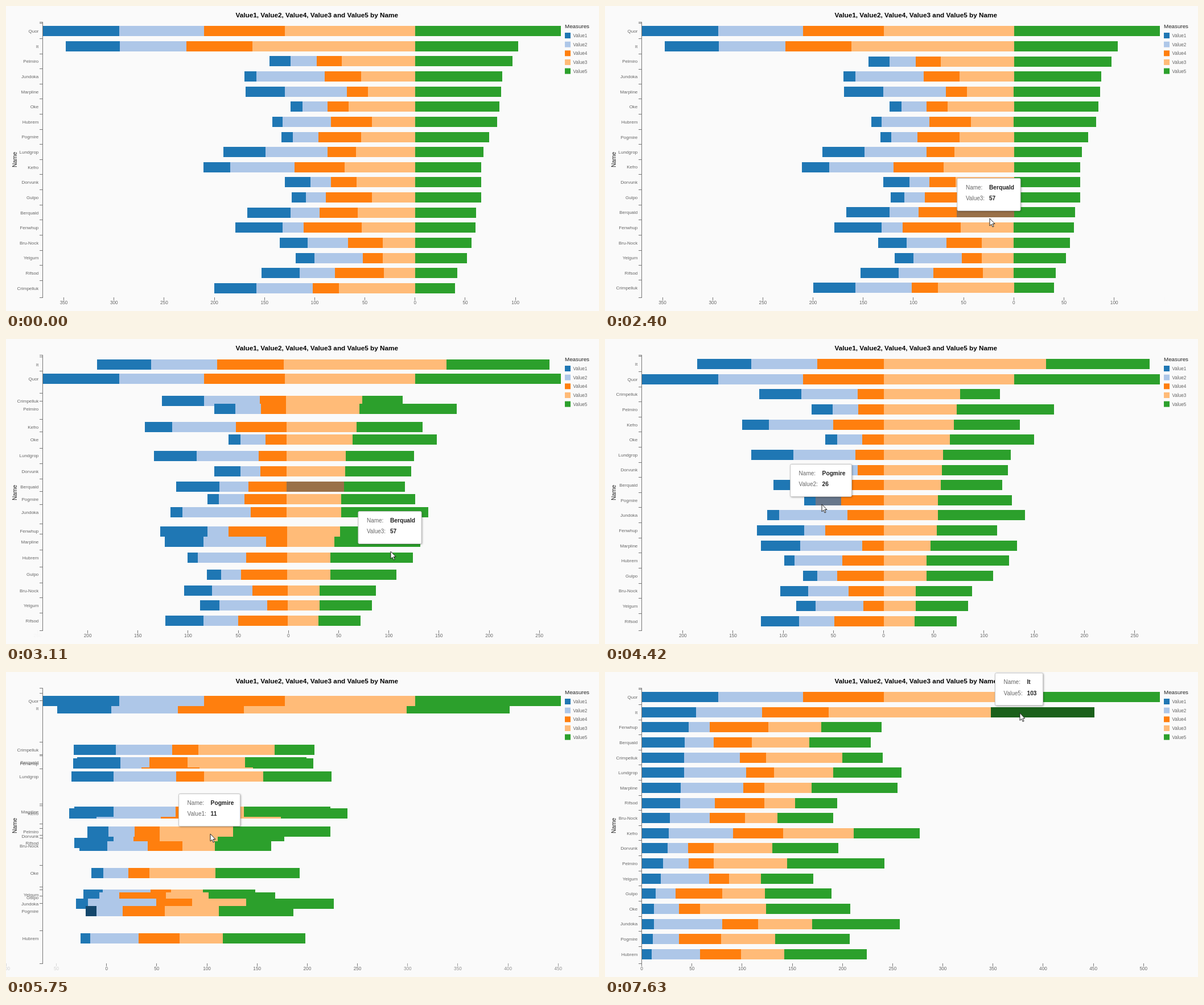
These frames come from a looping animation (1042 by 537 pixels, 8 s). An HTML page:

```html
<!DOCTYPE html>
<html lang="en">
<head>
<meta charset="utf-8">
<title>Stacked bars</title>
<style>
html, body { margin: 0; width: 100%; height: 100%; overflow: hidden; background: #fafafa; }
svg { display: block; width: 1042px; height: 537px; font-family: "Liberation Sans", Arial, sans-serif; }
.crisp { shape-rendering: crispEdges; }
</style>
</head>
<body>
<svg id="stage" viewBox="0 0 1042 537"></svg>
<script>
const LOOP = 8000, LEFT = 64.5, UNIT = 910 / 516, ROW = 26.62, TOP = 44.2, BAR = 18;
const SERIES = ['Value1', 'Value2', 'Value4', 'Value3', 'Value5'];
const COLORS = ['#1f77b4', '#aec7e8', '#ff7f0e', '#ffbb78', '#2ca02c'];
const DARK = ['#13476c', '#68778b', '#994c08', '#997048', '#1a601a'];
const rows = [
  ['Quor', 76, 85, 80, 130, 145], ['It', 54, 66, 66, 162, 103],
  ['Pelmiro', 21, 26, 25, 73, 97], ['Marpline', 39, 62, 21, 47, 86],
  ['Oke', 12, 25, 21, 66, 84], ['Hubrem', 10, 48, 41, 43, 82],
  ['Pogmire', 11, 26, 42, 54, 74], ['Jundoka', 12, 68, 36, 54, 87],
  ['Crimpelluk', 42, 56, 26, 76, 40], ['Lundgrop', 42, 62, 28, 59, 68],
  ['Kefro', 27, 64, 50, 70, 66], ['Dorvunk', 26, 20, 26, 58, 66],
  ['Gulpo', 14, 20, 46, 43, 66], ['Berquald', 43, 29, 38, 57, 61],
  ['Fenwhup', 47, 21, 58, 53, 60], ['Bru-Nock', 28, 40, 35, 32, 56],
  ['Yelgum', 19, 48, 20, 32, 52], ['Rifsod', 38, 35, 49, 31, 42]
].map(([name, ...vals]) => ({ name, vals }));

const sum = list => list.reduce((a, b) => a + b, 0);
const lerp = (a, b, p) => a + (b - a) * p;
const clamp = v => Math.max(0, Math.min(1, v));
const cubic = t => t < .5 ? 4 * t ** 3 : 1 - 4 * (1 - t) ** 3;
const smooth = t => t * t * (3 - 2 * t);

// Each mode aligns the bars on one series and sorts by it.
const modes = [4, 3, 0].map(base => {
  const order = [...rows].sort((a, b) => b.vals[base] - a.vals[base]);
  const offset = sum(rows[0].vals.slice(0, base));
  const zero = LEFT + UNIT * offset;
  return {
    zero,
    shows: v => v >= -offset && v <= 516 - offset ? 1 : 0,
    y: rows.map(r => TOP + ROW * order.indexOf(r)),
    x: rows.map(r => zero - UNIT * sum(r.vals.slice(0, base)))
  };
});

const stage = document.getElementById('stage');
function set(node, attrs) {
  for (const k in attrs) node.setAttribute(k, attrs[k]);
  return node;
}
function add(parent, tag, attrs) {
  const node = document.createElementNS('http://www.w3.org/2000/svg', tag);
  return parent.appendChild(set(node, attrs));
}
function label(parent, str, x, y, size, attrs) {
  const node = add(parent, 'text', { x, y: y + size * .36, 'font-size': size, fill: '#666', ...attrs });
  node.textContent = str;
  return node;
}
const place = (node, x, y) => set(node, { transform: `translate(${x.toFixed(2)} ${y.toFixed(2)})` });

add(stage, 'rect', { width: 1042, height: 537, fill: '#fafafa' });
const axisLine = { stroke: '#777', fill: 'none', 'stroke-width': 1, class: 'crisp' };

// Axes
add(stage, 'path', { d: 'M59 28.5H64.5V513.5H59', ...axisLine });
const rowLabels = rows.map(r => {
  const g = add(stage, 'g', {});
  add(g, 'path', { d: 'M59 -13.4H64.5', ...axisLine });
  label(g, r.name, 57.3, 0, 8, { 'text-anchor': 'end' });
  return g;
});
const ticks = [];
for (let v = -350; v <= 500; v += 50) {
  const g = add(stage, 'g', {});
  add(g, 'path', { d: 'M0 513V518', ...axisLine });
  label(g, Math.abs(v), 0, 522.5, 8.2, { 'text-anchor': 'middle' });
  ticks.push({ v, g });
}

// Bars: earlier rows lie on top.
const bars = [];
for (let i = rows.length - 1; i >= 0; i--) {
  const g = add(stage, 'g', { class: 'crisp' });
  let x = 0;
  const parts = rows[i].vals.map((v, k) => {
    const rect = add(g, 'rect', { x, y: -BAR / 2, width: v * UNIT, height: BAR, fill: COLORS[k] });
    x += v * UNIT;
    return rect;
  });
  bars[i] = { g, parts };
}

// Titles and legend
label(stage, 'Value1, Value2, Value4, Value3 and Value5 by Name', 546.3, 15.6, 11.75,
  { 'text-anchor': 'middle', 'font-weight': 'bold', fill: '#000' });
label(stage, 'Name', 0, 0, 10.2,
  { 'text-anchor': 'middle', fill: '#222', transform: 'translate(15.5 270.5) rotate(-90)' });
label(stage, 'Measures', 982, 35.5, 9.8, { fill: '#222' });
SERIES.forEach((s, k) => {
  const y = 52 + k * 15.65;
  add(stage, 'rect', { x: 982, y: y - 5, width: 10, height: 10, fill: COLORS[k] });
  label(stage, s, 996.5, y, 8.2);
});

// Tooltip and pointer
const tip = add(stage, 'g', { style: 'filter: drop-shadow(1px 1px 1.5px rgba(0,0,0,.3))' });
const tipBox = add(tip, 'rect', { x: .5, y: .5, height: 57, rx: 2, fill: '#fff', stroke: '#c4c4c4' });
const bold = { 'font-weight': 'bold', fill: '#222' };
label(tip, 'Name:', 15.5, 16.5, 10);
const tipName = label(tip, '', 56.5, 16.5, 10.2, bold);
const tipKey = label(tip, '', 15.5, 35.7, 10);
const tipValue = label(tip, '', 56.5, 35.7, 10.2, bold);
const pointer = add(stage, 'path', {
  d: 'M0 0V13L3 10.3L5.1 15L7.1 14.1L5 9.5H9Z', fill: '#fff', stroke: '#111', 'stroke-width': .9
});

// Time, x, y of the pointer
const path = [
  [450, 873, 534], [1210, 676, 374], [4110, 676, 374], [4420, 381, 291], [4720, 359, 285],
  [6680, 359, 285], [7470, 724, 89], [7550, 727, 78], [7630, 729, 72.3]
];
function pointerAt(t) {
  const i = path.findIndex(p => p[0] > t);
  if (i < 0) return path[path.length - 1].slice(1);
  if (i === 0) return null;
  const a = path[i - 1], b = path[i], p = smooth((t - a[0]) / (b[0] - a[0]));
  return [lerp(a[1], b[1], p), lerp(a[2], b[2], p)];
}

function hit([px, py], mode) {
  const row = mode.y.findIndex(y => Math.abs(y - py) < 10.6);
  if (row < 0 || px < mode.x[row]) return null;
  let x = mode.x[row];
  const part = rows[row].vals.findIndex(v => (x += v * UNIT) > px);
  return part < 0 ? null : { row, part };
}

function drawChart(t) {
  const step = t < 4800 ? 0 : 1;
  const a = modes[step], b = modes[step + 1];
  const p = cubic(clamp((t - [2322, 5167][step]) / 980));
  const zero = lerp(a.zero, b.zero, p);
  rows.forEach((r, i) => {
    const y = lerp(a.y[i], b.y[i], p);
    place(rowLabels[i], 0, y);
    place(bars[i].g, lerp(a.x[i], b.x[i], p), y);
  });
  ticks.forEach(({ v, g }) => {
    place(g, zero + v * UNIT, 0);
    set(g, { opacity: lerp(a.shows(v), b.shows(v), p) });
  });
}

// A hovered part stays marked until the pointer moves again.
let marked = null;
function drawPointer(t) {
  const pos = pointerAt(t);
  const mode = modes[t < 4110 ? 0 : t < 6690 ? 1 : 2];
  const over = pos && hit(pos, mode);
  if (marked) set(bars[marked.row].parts[marked.part], { fill: COLORS[marked.part] });
  marked = over;
  set(pointer, { visibility: pos ? 'visible' : 'hidden' });
  set(tip, { visibility: over ? 'visible' : 'hidden' });
  if (pos) place(pointer, ...pos);
  if (!over) return;
  const { row, part } = over;
  set(bars[row].parts[part], { fill: DARK[part] });
  tipName.textContent = rows[row].name;
  tipKey.textContent = SERIES[part] + ':';
  tipValue.textContent = rows[row].vals[part];
  const width = 67 + Math.max(tipName.getComputedTextLength(), tipValue.getComputedTextLength());
  set(tipBox, { width });
  place(tip, pos[0] - 2 - width / 2, pos[1] - 71);
}

const start = performance.now();
function frame(now) {
  const t = Math.max(0, now - start) % LOOP;
  drawChart(t);
  drawPointer(t);
  requestAnimationFrame(frame);
}
frame(start);
</script>
</body>
</html>
```
